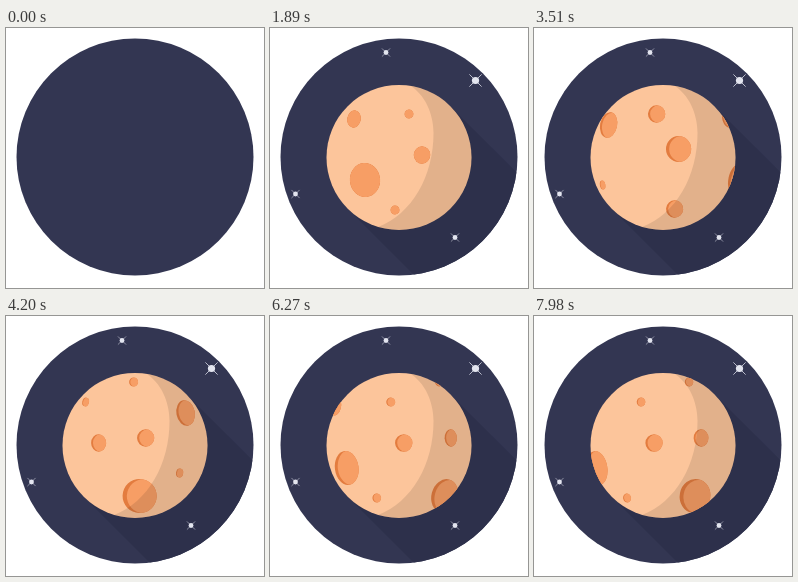
Write an HTML page with a canvas that moves like this. It is 258x260 px and loops after 8 s.

```html
<!DOCTYPE html>
<html lang="en">
<head>
<meta charset="utf-8">
<title>Spinning planet</title>
<style>
html, body { margin: 0; width: 100%; height: 100%; overflow: hidden; background: #fff; }
canvas { display: block; width: 258px; height: 260px; }
</style>
</head>
<body>
<canvas id="stage" width="258" height="260"></canvas>
<script>
const ctx = document.getElementById('stage').getContext('2d');
const LOOP = 8000, SPIN_START = 2790, TURN = 1800, WRAP = 274;
const CX = 129, CY = 129.4, R = 72.5;
const FRONT = 160; // craters left of this are there before the spin

// crater centres by size class; the radius grows by an even step
const craters = [
  [[139, 86], [125, 182], [187, 66], [233, 157]],
  [[84, 91], [152, 127], [199, 122], [287, 86], [305, 181]],
  [[239, 97], [309, 121]],
  [[95, 152], [193, 180]]
].flatMap((points, size) => points.map(([x, y]) => ({ x, y, r: 4.5 + 4.2 * size })));

const stars = [[116, 24.5], [205.5, 52.5], [25.5, 166], [185, 209.5]];

const shade = new Path2D('M139 57C155 66 163.5 86 163.5 105C163.5 148 142 186 108 199V210H210V50H139Z');
const clamp = v => Math.max(0, Math.min(1, v));
const ramp = (t, start, length) => 1 - (1 - clamp((t - start) / length)) ** 3;

function fillEllipse(x, y, rx, ry, color) {
  ctx.beginPath();
  ctx.ellipse(x, y, rx, ry, 0, 0, 7);
  ctx.fillStyle = color;
  ctx.fill();
}

function drawStar([x, y], i, t) {
  const r = (i === 1 ? 3.6 : 2.4) * ramp(t, 560 + 60 * i, 220);
  ctx.strokeStyle = '#c9cbd8';
  ctx.lineWidth = r / 4;
  ctx.beginPath();
  for (let k = 0; k < 4; k++) {
    const a = (k + 0.5) * Math.PI / 2;
    ctx.moveTo(x, y);
    ctx.lineTo(x + Math.cos(a) * r * 2.4, y + Math.sin(a) * r * 2.4);
  }
  if (r) ctx.stroke();
  fillEllipse(x, y, r, r, '#e3e5ef');
}

// Craters narrow and lean towards the rim, as on a sphere.
function drawCrater(x, y, r, depth) {
  const dx = (x - CX) / R, dy = (y - CY) / R;
  const rx = r * Math.sqrt(Math.max(0.36, 1 - dx * dx));
  ctx.save();
  ctx.translate(x, y);
  ctx.rotate(dx * dy * 0.6);
  fillEllipse(0, 0, rx, r, '#e37c3f');
  ctx.clip();
  fillEllipse(rx * 0.25 * depth, 0, rx, r, '#f79e65');
  ctx.restore();
}

function drawShadow(grow) {
  const d = R * Math.SQRT1_2, reach = 130 * grow;
  ctx.beginPath();
  ctx.moveTo(CX + d, CY - d);
  ctx.lineTo(CX + d + reach, CY - d + reach);
  ctx.lineTo(CX - d + reach, CY + d + reach);
  ctx.lineTo(CX - d, CY + d);
  ctx.fillStyle = '#2d304b';
  ctx.fill();
}

function drawPlanet(t) {
  const size = ramp(t, 330, 480);
  const spin = Math.max(0, t - SPIN_START);
  const shift = spin % TURN / TURN * WRAP;

  ctx.save();
  ctx.translate(CX, CY);
  ctx.scale(size, size);
  ctx.translate(-CX, -CY);
  drawShadow(ramp(t, 480, 480));
  fillEllipse(CX, CY, R, R, '#fcc59b');
  ctx.clip();
  for (const { x, y, r } of craters) {
    if (spin || x < FRONT) {
      drawCrater((x + shift + 40) % WRAP - 40, y, r * ramp(t, 600, 300), clamp(spin / 300));
    }
  }
  ctx.fillStyle = 'rgba(0,0,0,.1)';
  ctx.fill(shade);
  ctx.restore();
}

function draw(t) {
  ctx.clearRect(0, 0, 258, 260);
  ctx.save();
  fillEllipse(CX, 129, 118.5, 118.5, '#333652');
  ctx.clip();
  if (t > 330) drawPlanet(t);
  stars.forEach((star, i) => drawStar(star, i, t));
  ctx.restore();
}

let begin;
function tick(now) {
  begin ??= now;
  draw((now - begin) % LOOP);
  requestAnimationFrame(tick);
}
requestAnimationFrame(tick);
</script>
</body>
</html>
```
